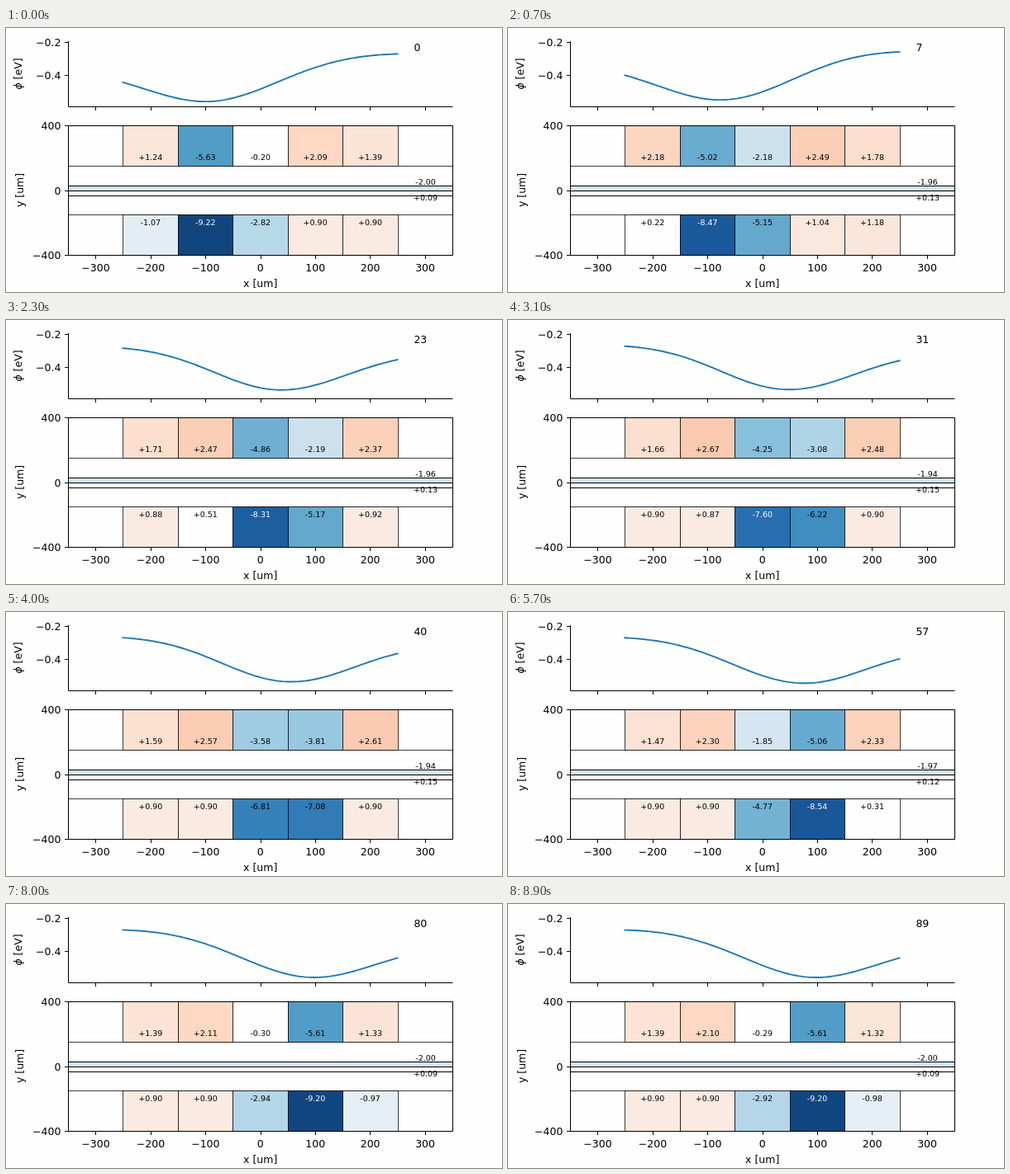
An HTML page that plays this animation: 600x320 px, repeating every 9 s.

```html
<!DOCTYPE html>
<html>
<head>
<meta charset="utf-8">
<style>
  html, body { margin: 0; width: 100%; height: 100%; overflow: hidden; background: #fefefe; }
  svg { display: block; font: 12.5px "DejaVu Sans", sans-serif; }
</style>
</head>
<body>
<svg id="stage" width="600" height="320" viewBox="0 0 600 320"></svg>
<script>
const stage = document.getElementById('stage');
const BLANK = '#fefefe';
const STEP_MS = 100, STEPS = 90;
const SMALL = 9.5;
const centers = [-200, -100, 0, 100, 200];

// Diverging palette, one stop every 2 V from -10 to +10.
const palette = ['053061', '2166ac', '4393c3', '92c5de', 'd1e5f0', 'f7f7f7',
  'fddbc7', 'f4a582', 'd6604d', 'b2182b', '67001f']
  .map(hex => [0, 2, 4].map(i => parseInt(hex.slice(i, i + 2), 16)));

const X = um => 307.5 + um * 465 / 700;
const Y = um => 196.8 - um * 0.196;
const yPhi = ev => 18.1 - (ev + 0.2) * 198;
const snap = p => Math.round(p) + 0.5;

function add(tag, attrs, text) {
  const el = document.createElementNS('http://www.w3.org/2000/svg', tag);
  for (const name in attrs) el.setAttribute(name, attrs[name]);
  if (text !== undefined) el.textContent = text;
  return stage.appendChild(el);
}
const line = d => add('path', { d, fill: 'none', stroke: '#000', 'stroke-width': 1 });
const label = (x, y, text, anchor = 'middle', size = 12.5) =>
  add('text', { x, y, 'text-anchor': anchor, 'font-size': size }, text);

function box(x1, x2, top, bottom, weight = 0.75) {
  const x = snap(X(x1)), y = snap(Y(top));
  return add('rect', {
    x, y, width: snap(X(x2)) - x, height: snap(Y(bottom)) - y,
    fill: BLANK, stroke: '#000', 'stroke-width': weight
  });
}

function color(v) {
  if (v > -0.9 && v < 0.6) return BLANK;
  const p = Math.min(9.999, Math.max(0, v / 2 + 5));
  const i = Math.floor(p);
  return `rgb(${palette[i].map((c, k) => Math.round(c + (palette[i + 1][k] - c) * (p - i)))})`;
}

// The well moves quickly past the centre, then creeps to its final place.
function ease(s) {
  s = Math.min(1, Math.max(0, s));
  return s * s * (3 - 2 * s);
}
const wellAt = step => -91 + 125 * ease(step / 26) + 56 * ease((step - 15) / 67);
const tiltAt = step => 1.2 * Math.exp(-(((step - 13) / 5) ** 2));

function lowerVolt(d) {
  const c = Math.abs(d) < 145 ? Math.cos(Math.PI * d / 290) : 0;
  return 0.9 - 10.2 * c ** 1.7;
}
const upperVolt = d => lowerVolt(d) + 3.6 / Math.cosh(d / 108);

// Five upper electrodes, five lower ones, two centre strips.
function voltages(step) {
  const well = wellAt(step), tilt = tiltAt(step) / 200;
  const row = volt => centers.map(x => volt(x - well) + tilt * x);
  const strip = -1.975 - 0.035 * Math.cos(2 * Math.PI * well / 100);
  return [...row(upperVolt), ...row(lowerVolt), strip, strip + 2.093];
}

// Potential of flat rectangular electrodes seen from a height above the centre line.
const HEIGHT = 80;
const corner = (x, y) => Math.atan(x * y / (HEIGHT * Math.hypot(x, y, HEIGHT)));
const edge = x => corner(x, 400) - corner(x, 150);
function potential(x, v) {
  return centers.reduce((sum, center, i) => {
    const d = x - center;
    return sum + (v[i] + v[i + 5]) * (edge(d + 50) - edge(d - 50)) / (2 * Math.PI);
  }, 0.141 * (v[10] + v[11]));
}

// Electrodes
box(-350, 350, 150, 30);
box(-350, 350, -30, -150);
const strips = [box(-350, 350, 30, 0, 1), box(-350, 350, 0, -30, 1)];
const row = (top, bottom) => centers.map(x => box(x - 50, x + 50, top, bottom));
const boxes = [...row(400, 150), ...row(-150, -400), ...strips];

// Axes
line('M75.5 16V95.5H540.5');
line('M75.5 118.5H540.5V275.5H75.5Z');
for (let um = -300; um <= 300; um += 100) {
  const x = snap(X(um));
  line(`M${x} 95.5v4.5M${x} 275.5v4.5`);
  label(X(um) + 0.3, 294.8, String(um).replace('-', '−'));
}
function yTick(y, text) {
  line(`M75.5 ${snap(y)}h-4.5`);
  label(66.4, y + 4.7, text, 'end');
}
yTick(17, '−0.2');
yTick(57, '−0.4');
yTick(Y(400), '400');
yTick(Y(0), '0');
yTick(Y(-400), '−400');
label(307.7, 314, 'x [um]');
label(0, 0, 'y [um]').setAttribute('transform', 'translate(21 196.5) rotate(-90)');
const phi = label(0, 0, '');
phi.innerHTML = '<tspan font-style="italic">ϕ</tspan> [eV]';
phi.setAttribute('transform', 'translate(19 55.5) rotate(-90)');

const curve = add('path', {
  fill: 'none', stroke: '#1f77b4', 'stroke-width': 1.875, 'stroke-linecap': 'square'
});
const counter = label(493.4, 28.3, '0', 'start');
const valueRow = y => centers.map(x => label(X(x) + 0.2, y, '', 'middle', SMALL));
const values = [
  ...valueRow(160), ...valueRow(239.3),
  label(507.6, 190, '', 'middle', SMALL), label(507.6, 209.2, '', 'middle', SMALL)
];

function draw(step) {
  const v = voltages(step);
  v.forEach((volt, i) => {
    boxes[i].setAttribute('fill', color(volt));
    values[i].textContent = (volt < 0 ? '' : '+') + volt.toFixed(2);
    values[i].setAttribute('fill', volt < -7.5 ? '#fff' : '#000');
  });
  const points = [];
  for (let x = -250; x <= 250; x += 5) {
    points.push(X(x).toFixed(2) + ' ' + yPhi(potential(x, v)).toFixed(2));
  }
  curve.setAttribute('d', 'M' + points.join('L'));
  counter.textContent = step;
}

const start = performance.now();
function tick() {
  draw(Math.floor((performance.now() - start) / STEP_MS) % STEPS);
  requestAnimationFrame(tick);
}
tick();
</script>
</body>
</html>
```
